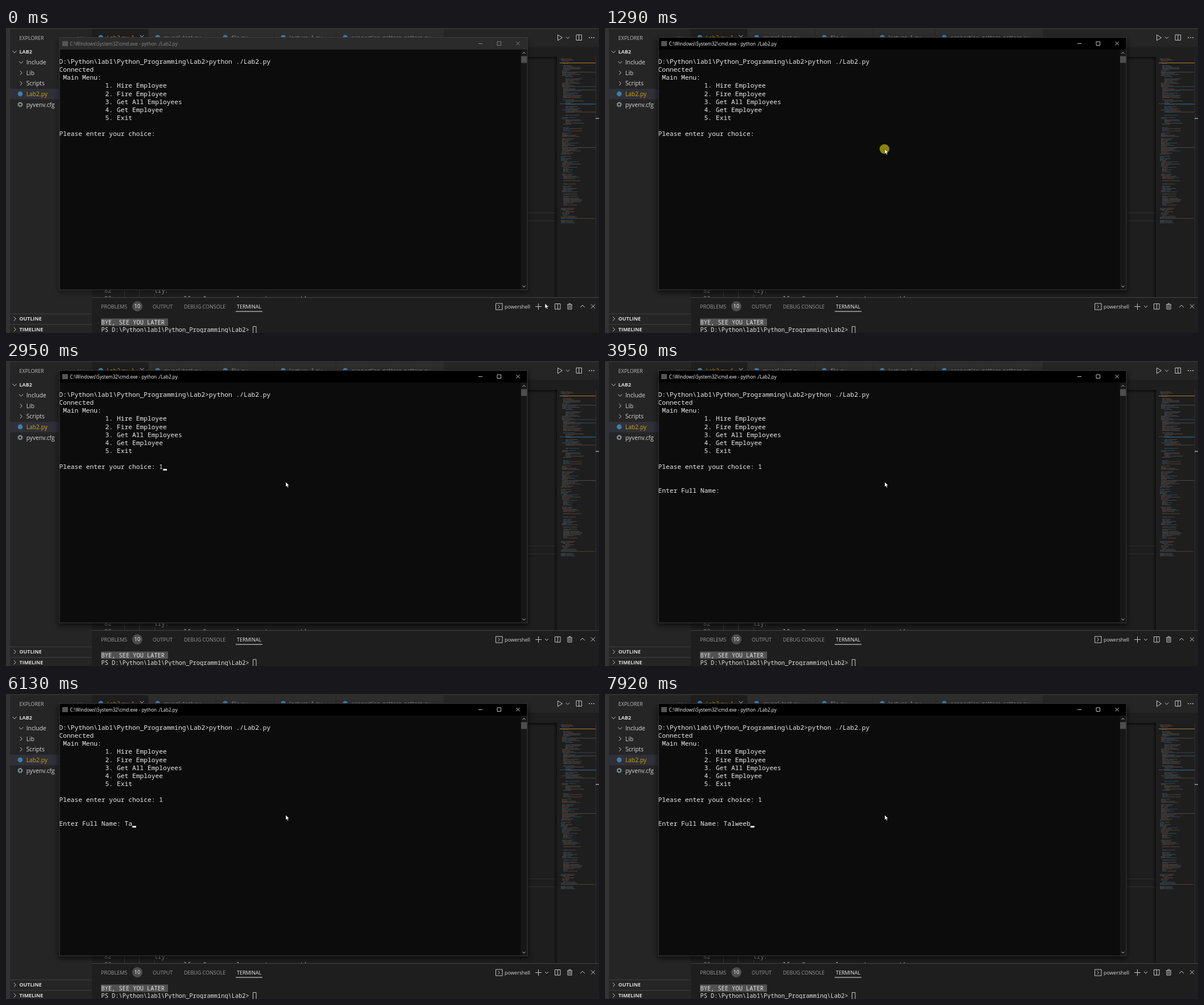
An HTML page for the animation above (8 s loop, 1043 px wide and 537 px high).

```html
<!DOCTYPE html>
<html lang="en">
<head>
<meta charset="utf-8">
<title>Console session</title>
<style>
html, body { margin: 0; width: 100%; height: 100%; overflow: hidden; background: #1e1e1e; }
svg { display: block; width: 1043px; height: 537px; }
text { white-space: pre; font-family: "Open Sans", "Noto Sans", sans-serif; }
.mono { font-family: "Noto Sans Mono", "DejaVu Sans Mono", monospace; }
.line { fill: none; stroke: #c5c5c5; stroke-width: 1; }
</style>
</head>
<body>
<svg id="stage" viewBox="0 0 1043 537">
  <defs>
    <filter id="blur" x="-5%" y="-5%" width="110%" height="112%"><feGaussianBlur stdDeviation="4.5"/></filter>
    <linearGradient id="fade" x2="0" y2="1"><stop stop-color="#000" stop-opacity=".6"/><stop offset="1" stop-color="#000" stop-opacity="0"/></linearGradient>
    <linearGradient id="fadeLeft" x1="1" x2="0"><stop stop-color="#000" stop-opacity=".5"/><stop offset="1" stop-color="#000" stop-opacity="0"/></linearGradient>
    <clipPath id="editorClip"><rect x="151" y="461" width="767" height="13"/></clipPath>
  </defs>
  <g id="editor"></g>
  <g id="minimap"></g>
  <g id="sidebar"></g>
  <g id="panel"></g>
  <rect id="shadow" x="92" y="20" width="827" height="446" filter="url(#blur)"/>
  <g id="console"></g>
  <circle id="click" cx="491.5" cy="213" r="8.6" fill="#8b8400"/>
  <path id="pointer" d="M0 0V8.6L2 6.9L3.4 10L4.9 9.3L3.5 6.3H6.1Z" fill="#fff" stroke="#000" stroke-width=".5"/>
</svg>
<script>
const byId = id => document.getElementById(id);
const rect = (x, y, w, h, fill, extra = '') =>
  `<rect x="${x}" y="${y}" width="${w}" height="${h}" fill="${fill}" ${extra}/>`;
const label = (x, y, size, fill, value, extra = '') =>
  `<text x="${x}" y="${y}" font-size="${size}" fill="${fill}" ${extra}>${value.replace(/>/g, '&gt;')}</text>`;
const mono = (x, y, size, fill, value, extra = '') => label(x, y, size, fill, value, `class="mono" ${extra}`);
const line = (d, extra = '') => `<path class="line" d="${d}" ${extra}/>`;
const dot = (x, y, r, fill) => `<circle cx="${x}" cy="${y}" r="${r}" fill="${fill}"/>`;
const dots = (x, y) => [-4, 0, 4].map(dx => dot(x + dx, y, 1, '#c5c5c5')).join('');
const cross = (x, y, r) => line(`M${x - r} ${y - r}l${2 * r} ${2 * r}m0 ${-2 * r}l${-2 * r} ${2 * r}`);
const chevron = (x, y, r, dir) => line({
  down: `M${x - r} ${y - r / 2}l${r} ${r}l${r} ${-r}`,
  up: `M${x - r} ${y + r / 2}l${r} ${-r}l${r} ${r}`,
  right: `M${x - r / 2} ${y - r}l${r} ${r}l${-r} ${r}`
}[dir]);
const splitIcon = (x, y) => line(`M${x - 4.5} ${y - 4.5}h9.5v9.5h-9.5zM${x + .3} ${y - 4.5}v9.5`);

const BLUE = '#3f7ea6', UI = 10.3, CAPS = 8.95, CODE = 10.33;

function drawEditor() {
  const tabs = [[151, 'Lab2.py  1'], [251, 'mysql_test.py'], [370, 'file.py'],
    [472, 'lecture_1.py'], [581, 'properties_getters_setters.py']];
  let out = rect(0, 0, 1043, 537, '#1e1e1e') + rect(151, 2, 892, 31, '#252526') + rect(0, 0, 1043, 2, '#303030');
  tabs.forEach(([x, name], i) => {
    const end = i + 1 < tabs.length ? tabs[i + 1][0] - 1 : 770;
    out += rect(x, 2, end - x, 31, i ? '#2d2d2d' : '#1e1e1e') + dot(x + 15.7, 16.5, 4.3, BLUE) +
      label(x + 26.5, 21, UI, i ? '#8c8c8c' : '#b39200', name);
  });
  out += cross(239, 16, 3.5);
  out += line('M970.5 12v10l8-5z') + chevron(988, 17, 3, 'down') + splitIcon(1007.5, 16.5) + dots(1030, 17);
  out += rect(917, 51, 52, 5, 'url(#fade)');
  out += line('M917 325.5h52M917 339.5h52', 'style="stroke:#303030"');
  out += rect(963, 51, 6, 423, 'url(#fadeLeft)');
  out += `<g clip-path="url(#editorClip)">` +
    line('M208.5 461v14M234.5 461v14M261.5 468v7', 'style="stroke:#3a3a3a"') +
    mono(173, 465.5, CODE, '#858585', '82') + mono(173, 479.5, CODE, '#858585', '83') +
    mono(261, 465.5, CODE, '#b5a5b4', 'try:') +
    mono(300, 479.5, CODE, '#c0c0c0', 'self.__dbc = mysql.connector.connect(') + '</g>';
  byId('editor').innerHTML = out;
}

function drawMinimap() {
  const inks = ['#a5745d', '#4f83a3', '#8a8a8a'];
  let seed = 11;
  const random = () => (seed = seed * 16807 % 2147483647) / 2147483647;
  const pick = list => list[Math.floor(random() * list.length)];
  let out = '', indent = 0;
  for (let y = 52; y < 343; y += 1.95) {
    if (random() < .25) indent = random() < .2 ? 10 : 2 + 2 * Math.floor(random() * 3);
    if (random() < .14) continue;
    const x = 974 + indent;
    const width = Math.min(random() < .1 ? 60 : 6 + 28 * random(), 1037 - x);
    const head = width * (.2 + random() * .3);
    out += rect(x, y, head, .9, pick(inks), 'opacity=".55"') +
      rect(x + head + .8, y, width - head - .8, .9, pick(inks), 'opacity=".45"');
  }
  out += rect(974, 61, 63, 1, '#b07a2a') + rect(974, 133, 63, 1, '#2b4c6c');
  out += line('M1037.5 51v423', 'style="stroke:#303030"') + rect(1037, 158.5, 6, 1.5, '#a0a0a0');
  byId('minimap').innerHTML = out;
}

function drawSidebar() {
  const ink = '#d8d8d8', bold = 'font-weight="700"';
  let out = rect(0, 2, 7, 535, '#333333') + rect(7, 2, 144, 535, '#252526') + rect(7, 107, 144, 18.5, '#303039');
  out += label(23.5, 20.5, CAPS, '#bbbbbb', 'EXPLORER') + dots(131, 16.5);
  out += chevron(15, 42, 3.6, 'down') + label(23.5, 45, CAPS, ink, 'LAB2', bold);
  ['Include', 'Lib', 'Scripts', 'Lab2.py', 'pyvenv.cfg'].forEach((name, i) => {
    const y = 60.3 + i * 18.6;
    out += label(35.7, y + 3.8, UI, i === 3 ? '#cca700' : ink, name);
    if (i < 3) out += chevron(26.5, y, 3.6, i ? 'right' : 'down');
  });
  out += dot(25, 116, 4.4, BLUE);
  out += '<circle cx="25" cy="134.7" r="2.8" fill="none" stroke="#8a9899" stroke-width="1.6"/>' +
    '<circle cx="25" cy="134.7" r="4.1" fill="none" stroke="#8a9899" stroke-width="1.2" stroke-dasharray="1.6 1.62"/>';
  ['OUTLINE', 'TIMELINE'].forEach((name, i) => {
    const y = 512 + i * 18.7;
    out += rect(7, y - 9.3, 144, 1, '#414142') + chevron(15.5, y, 3.6, 'right') +
      label(23.5, y + 3.3, CAPS, ink, name, bold);
  });
  byId('sidebar').innerHTML = out;
}

function drawPanel() {
  const ink = '#989898', bright = '#e7e7e7', print = '#e2e2e2';
  let out = rect(151, 474, 892, 63, '#1e1e1e') + rect(151, 474, 892, 1, '#444444');
  out += label(167, 493.7, CAPS, ink, 'PROBLEMS') + label(258, 493.7, CAPS, ink, 'OUTPUT') +
    label(313, 493.7, CAPS, ink, 'DEBUG CONSOLE') + label(406, 493.7, CAPS, bright, 'TERMINAL') +
    rect(404, 498.5, 47, 1, bright);
  out += dot(231, 490, 9, '#4d4d4d') + label(231, 493.3, 9, '#ffffff', '10', 'text-anchor="middle"');
  out += line('M861.5 485h11.5v11h-11.5zM865.5 487.7l3 2.8l-3 2.8') + label(877, 493.5, 8.8, '#d4d4d4', 'powershell');
  out += line('M936.5 485v11M931 490.5h11') + chevron(951, 490.5, 3, 'down') + splitIcon(970, 490);
  out += line('M987 487h9M990 487v-1.8h3v1.8M988 487v8h7v-8M990.3 488.5v5M992.7 488.5v5');
  out += chevron(1014, 490, 4, 'up') + cross(1032.5, 490, 3.5);
  out += rect(167, 511.5, 118, 13, '#525252') + mono(167.5, 522, CODE, print, 'BYE, SEE YOU LATER') +
    mono(167.5, 535.2, CODE, print, 'PS D:\\Python\\lab1\\Python_Programming\\Lab2>') +
    line('M434.5 525.5h5.5v12h-5.5z');
  byId('panel').innerHTML = out;
}

const LEFT = 93.5, CELL = 6.77, CHOICE_ROW = 9, NAME_ROW = 12;
const rowY = row => 63.1 + row * 14.1;
const consoleText = (row, value, id = '') => mono(LEFT, rowY(row), 11.28, '#ececec', value, id && `id="${id}"`);

function drawConsole() {
  const menu = ['Hire Employee', 'Fire Employee', 'Get All Employees', 'Get Employee', 'Exit'];
  const rows = ['D:\\Python\\lab1\\Python_Programming\\Lab2>python ./Lab2.py', 'Connected', ' Main Menu:',
    ...menu.map((item, i) => `${' '.repeat(12)}${i + 1}. ${item}`)];
  let out = rect(94, 16.5, 823, 444.5, '#0c0c0c') + rect(94, 16.5, 823, 21.5, '#2b2b2b', 'id="titleBar"');
  out += rect(99, 23, 10, 9, '#555555');
  out += label(112.5, 30.7, 8.15, '#fff', 'C:\\Windows\\System32\\cmd.exe - python ./Lab2.py', 'id="titleText"');
  out += '<g id="buttons">' + line('M831 27.5h7M864 24h6.5v6.5h-6.5z') + cross(900.5, 27.3, 3.2) + '</g>';
  out += rect(905.5, 38, 11.5, 423, '#171717') + rect(906, 49.5, 10.5, 12, '#4d4d4d') +
    chevron(911, 44, 2.6, 'up') + chevron(911, 455, 2.6, 'down');
  out += rows.map((value, i) => consoleText(i, value)).join('');
  out += consoleText(CHOICE_ROW, '', 'choice') + consoleText(NAME_ROW, '', 'name');
  out += rect(0, 0, CELL, 3, '#f0f0f0', 'id="caret"');
  out += rect(94, 16.5, 823, 444.5, 'none', 'stroke="#3c3c3c" stroke-width="1"');
  byId('console').innerHTML = out;
}

const PERSON = 'Talweeb';
const FOCUS = 1290, CHOICE_KEY = 2950, ENTER_KEY = 3230;
const nameKeys = [5830, 6130, 6860, 7060, 7380, 7580, 7920];
const keys = [CHOICE_KEY, ENTER_KEY, ...nameKeys];

// The caret blinks on a steady clock; ticks right after a key press are skipped.
const blinkTick = t => Math.floor((t - 1810) / 526);
function caretShown(t) {
  if (t < FOCUS) return false;
  const lastKey = keys.filter(key => key <= t).pop() || 0;
  const ticks = Math.max(0, blinkTick(t) - blinkTick(lastKey + 200));
  return ticks % 2 === 0;
}

// Eased progress of a pointer move, sampled in a few steps
function glide(t, start, interval, steps) {
  const step = Math.floor((t - start) / interval) + 1;
  const p = Math.min(Math.max(step / steps, 0), 1);
  return 1 - (1 - p) ** 1.6;
}

function pointerAt(t) {
  const sweep = glide(t, 70, 90, 4), nudge = glide(t, 870, 70, 3);
  return [948 - 436 * sweep - 20 * nudge, 485 - 280 * sweep + 8 * nudge];
}

function render(t) {
  const active = t >= FOCUS;
  byId('titleBar').setAttribute('fill', active ? '#000000' : '#2b2b2b');
  byId('titleText').setAttribute('fill', active ? '#ffffff' : '#8c8c8c');
  byId('buttons').setAttribute('opacity', active ? 1 : .55);
  byId('shadow').setAttribute('opacity', active ? .6 : .35);
  byId('click').setAttribute('visibility', active && t < FOCUS + 70 ? 'visible' : 'hidden');
  byId('pointer').setAttribute('transform', `translate(${pointerAt(t).join(' ')})`);

  const letters = nameKeys.filter(key => key <= t).length;
  const choice = 'Please enter your choice: ' + (t >= CHOICE_KEY ? '1' : '');
  const name = t >= ENTER_KEY ? 'Enter Full Name: ' + PERSON.slice(0, letters) : '';
  byId('choice').textContent = choice;
  byId('name').textContent = name;
  const caret = byId('caret');
  caret.setAttribute('x', LEFT + (name || choice).length * CELL);
  caret.setAttribute('y', rowY(name ? NAME_ROW : CHOICE_ROW) - .1);
  caret.setAttribute('visibility', caretShown(t) ? 'visible' : 'hidden');
}

drawEditor();
drawMinimap();
drawSidebar();
drawPanel();
drawConsole();
const start = performance.now();
function tick() {
  render((performance.now() - start) % 8000);
  requestAnimationFrame(tick);
}
tick();
</script>
</body>
</html>
```
